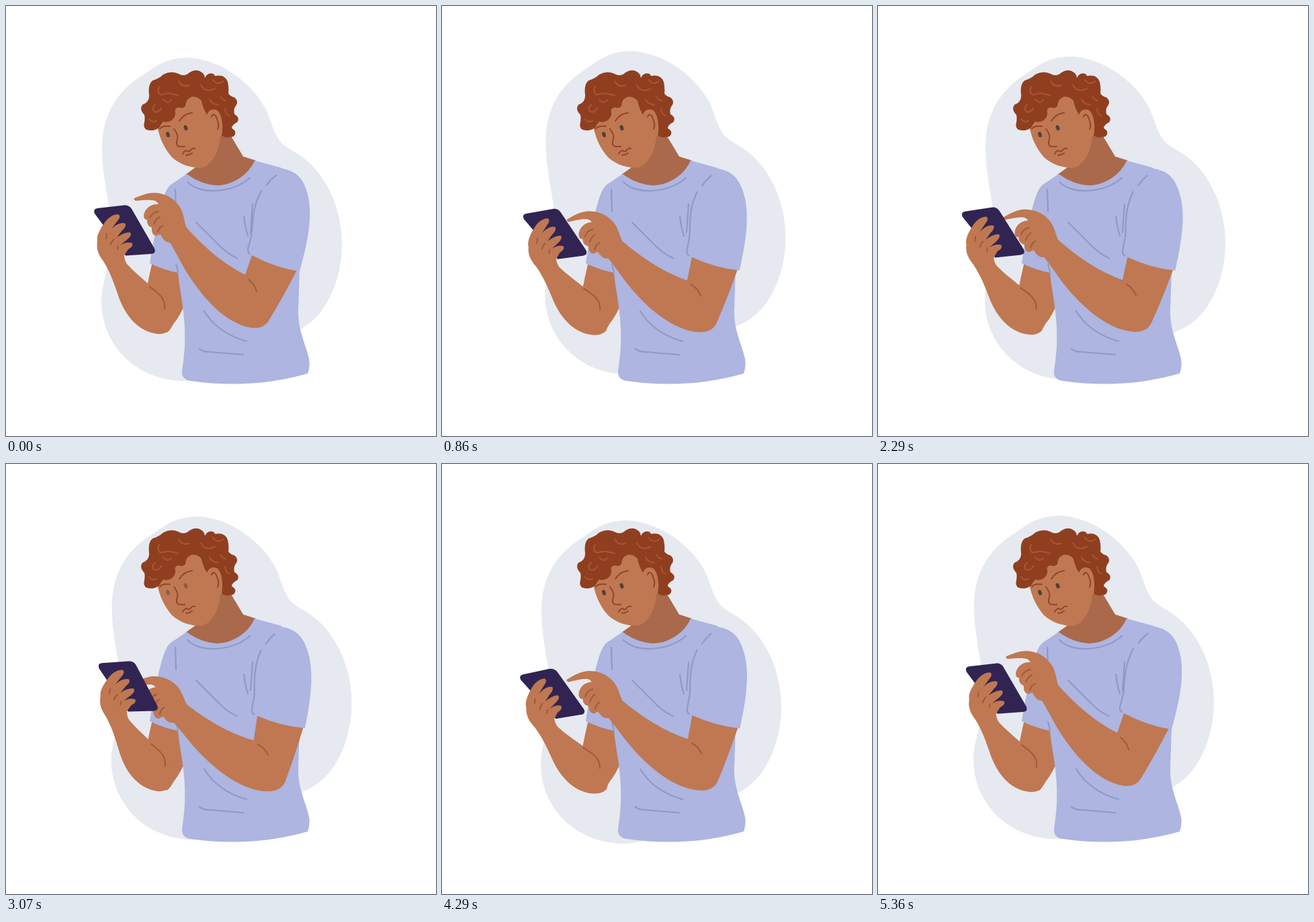
Animation, 640 px wide and 640 px high, one loop 5.43 s. Source, as an HTML page:

```html
<!DOCTYPE html>
<html lang="en">
<head>
<meta charset="utf-8">
<title>Man with phone</title>
<style>
  html, body { margin: 0; width: 100%; height: 100%; overflow: hidden; background: #fff; }
  svg { display: block; width: 100%; height: 100%; }
  .line { fill: none; stroke-width: 2; stroke-linecap: round; stroke-linejoin: round; }
  .skin { fill: #bf7852; }
  .shirt { fill: #adb5e0; }
  .skinLine { stroke: #a05a38; }
  .shirtLine { stroke: #9099c4; stroke-width: 2.2; }
</style>
</head>
<body>
<svg viewBox="0 0 640 640">
  <path id="blob" fill="#e6e9f0" d="M267 77C310 76 362 108 386 152C394 168 397 185 406 199C414 210 424 213 440 224C476 250 500 300 500 355C500 405 478 465 432 484C390 500 350 550 270 558C195 560 142 505 142 440C142 410 157 385 157 340C157 300 143 260 143 212C143 165 162 128 205 102C225 87 240 78 267 77Z"/>

  <!-- far upper arm -->
  <path class="skin" d="M218 380Q213 402 209 422L225 470L240 486Q246 480 250 472Q258 462 264 449L270 400Z"/>

  <!-- torso -->
  <path fill="#aa694a" d="M281 241L267 251Q290 269 314 269C340 269 362 250 372 230L353 224Q343 207 335 194L318 185Z"/>
  <path class="shirt" d="M269 250L245 266C236 274 232 292 227 312C222 340 217 362 214 383Q235 393 256 397C258 420 263 440 265 465C268 500 265 522 262 543Q261 556 275 558Q365 571 449 547Q453 537 451 525C446 503 434 482 435 452L437 393L430 290L410 241L370 230C362 250 338 267 314 267Q290 266 269 250Z"/>
  <path class="line shirtLine" d="M270 262C280 272 297 276 312 275C332 274 350 267 363 256M283 322L320 359Q333 371 344 375M295 454Q315 487 358 499M288 510Q292 515 305 515L353 519M252 273L253 306M253 384L256 396M367 295L364 337M354 313Q356 330 360 342"/>

  <!-- head -->
  <path class="skin" d="M225 178Q230 206 247 225C261 238 278 241 290 241C308 238 318 213 319 194L322 193L326 160L300 115L250 120Z"/>
  <path fill="#8f3f1f" d="M213 185Q203 184 206 173Q207 167 206 162Q198 154 203 147Q214 143 213 132Q211 117 218 111Q228 108 234 102Q246 95 259 102Q267 105 273 99Q284 92 293 100Q296 103 296 107Q300 98 309 101L311 104Q326 101 330 113Q332 122 331 130Q333 134 340 136Q346 141 343 147Q338 153 340 161Q349 166 344 173Q336 177 336 182Q345 187 339 194Q328 198 321 193C324 178 321 160 314 155Q303 151 299 162Q293 152 291 141Q285 134 277 135Q268 137 267 149Q264 153 258 151Q250 151 252 158Q253 164 247 170Q240 174 234 172Q230 176 228 181Q222 186 213 185Z"/>
  <path class="line" stroke="#ab5433" d="M228 120Q224 129 230 132Q238 130 244 130Q251 132 257 133M257 112Q262 122 273 118M290 118Q297 130 311 123M308 110Q315 119 323 112M234 139Q240 147 246 140M222 147Q216 151 220 157Q227 160 231 152M213 168Q217 174 224 171M303 139Q306 146 316 147M319 135Q322 140 327 141M326 153Q327 163 333 163"/>
  <path class="line" stroke="#92452a" d="M229 183Q231 178 244 179M258 171Q265 160 277 159M263 220Q267 213 270 216Q273 218 276 213Q279 211 281 212M268 222Q273 222 277 219M250 183Q257 192 255 198C251 210 258 210 266 209M306 165Q308 158 313 165C315 172 318 175 315 183"/>
  <g id="eyes" fill="#563f38">
    <ellipse cx="241" cy="191.3" rx="2.7" ry="4.1" transform="rotate(-18 241 191.3)"/>
    <ellipse cx="267.5" cy="181.3" rx="2.7" ry="4.1" transform="rotate(-18 267.5 181.3)"/>
  </g>

  <!-- near arm -->
  <g id="arm">
    <path class="skin" d="M375 345L366 371L356 400C330 387 300 365 268 329C265 318 264 306 258 298C249 285 236 279 222 278C208 278 199 283 191 286Q189 288 193 290C205 289 214 288 222 290Q226 292 227 295C215 294 206 302 205 312Q205 318 210 318Q209 327 217 330Q216 340 223 342L230 340C234 348 237 352 244 352C254 368 262 386 272 401C292 432 325 472 365 479Q382 481 390 470Q412 434 432 395L425 345Z"/>
    <path class="line skinLine" d="M214 315Q219 306 227 306M220 324Q223 317 229 314M226 336Q228 329 234 327M361 407Q370 414 373 425"/>
  </g>
  <g id="sleeve">
    <path class="shirt" d="M392 240Q404 239 412 242C437 247 446 262 451 290C456 325 445 365 437 395Q402 390 366 371L370 300Z"/>
    <path class="line shirtLine" d="M380 275C370 293 367 312 366 335C365 347 362 352 360 362Q360 368 363 369M402 252Q393 259 388 266"/>
  </g>

  <!-- far forearm with phone -->
  <g id="forearm">
    <path fill="#312452" d="M136 301L176 296.5Q183 296 187 302L221 361Q224 368 216 369L178 371.5L132 309Q129 302 136 301Z"/>
    <path class="skin" d="M136 350C134 343 140 332 145 325C152 314 160 310 167 310Q171 312 168 317L156 333C162 326 172 321 178 324Q179 329 173 334L165 344Q177 336 185 337Q188 341 181 347L170 356Q180 350 188 353Q190 358 182 362L176 371Q176 378 180 384C190 395 200 403 211 413L245 440Q250 470 243 483Q235 490 222 487.5C196 483 178 461 168 434C161 413 155 396 145 380C138 371 134 362 136 350Z"/>
    <path class="line skinLine" d="M150 339L149 346M161 347Q157 350 156 355M167 357L166 362M214 418C228 428 238 436 236 451"/>
  </g>
</svg>
<script>
const LOOP = 5430, STEPS = 76;

// Eases in and out between [time, value] turning points and back to the first one.
const swing = (...points) => t => {
  const next = points.findIndex(p => p[0] > t);
  const [t0, a] = points.at(next < 0 ? -1 : next - 1);
  const [t1, b] = next < 0 ? [LOOP, points[0][1]] : points[next];
  return a + (b - a) * (1 - Math.cos(Math.PI * (t - t0) / (t1 - t0))) / 2;
};

const blobX = swing([0, 0], [1400, 17], [2300, 17]);
const blobY = swing([0, 0], [1150, -11.5], [1400, -11.5], [2600, 0], [4300, 7]);
const phoneTurn = swing([0, 0], [1550, -6.5], [3070, 2.35], [4600, -6.5]);   // degrees
const armTurn = swing([0, 0], [1500, -12.6], [2350, -6.9], [3550, -12.7]);

const part = id => document.getElementById(id);
const move = (id, how) => part(id).setAttribute('transform', how);

function draw() {
  const step = Math.floor(performance.now() % LOOP / LOOP * STEPS + .1) % STEPS;
  const t = step * LOOP / STEPS;
  move('blob', `translate(${blobX(t)} ${blobY(t)})`);
  move('forearm', `rotate(${phoneTurn(t)} 253 464)`);
  move('arm', `rotate(${armTurn(t)} 423 338)`);
  move('sleeve', `rotate(${armTurn(t) * .39} 413 283)`);
  part('eyes').setAttribute('opacity', Math.min(1, Math.abs(t - 3140) / 150));   // blink
  requestAnimationFrame(draw);
}
draw();
</script>
</body>
</html>
```
